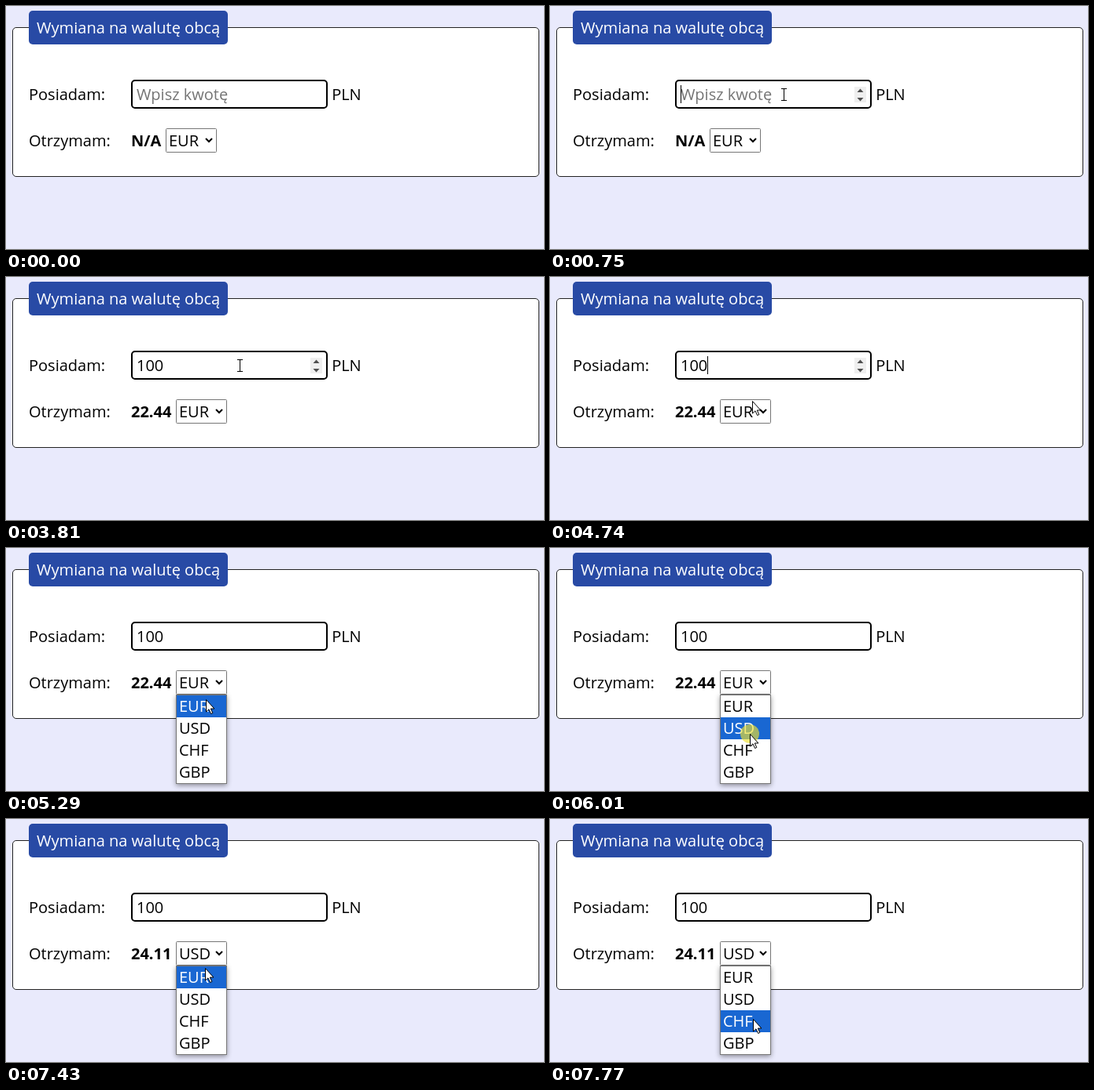
An HTML page for the animation above (8000 ms loop, 684 by 310 pixels).

```html
<!DOCTYPE html>
<html lang="pl">
<head>
<meta charset="utf-8">
<title>Wymiana na walutę obcą</title>
<style>
  html, body { margin: 0; width: 100%; height: 100%; overflow: hidden; background: #e9eafc; }
  svg { display: block; font: 20px "Open Sans", sans-serif; }
  .focus { stroke: #000; stroke-width: 2; }
  #list { filter: drop-shadow(0 2px 3px rgba(0, 0, 0, .4)); }
</style>
</head>
<body>
<svg width="684" height="310" viewBox="0 0 684 310">
  <rect x="8.5" y="27.5" width="669" height="190" rx="4.5" fill="#fff" stroke="#222"/>
  <rect x="29" y="6" width="253" height="43" rx="5" fill="#284aa5"/>
  <text x="39" y="35" fill="#fff">Wymiana na walutę obcą</text>

  <text x="29" y="120">Posiadam:</text>
  <rect class="focus" x="160" y="95" width="248" height="35" rx="4" fill="#fff"/>
  <text id="amount" x="166" y="120"></text>
  <rect id="caret" y="101" width="1" height="23"/>
  <g id="spinner">
    <rect x="387" y="103" width="15" height="20" fill="#efefef"/>
    <path d="M390.5 110h8l-4-4.5zM390.5 117h8l-4 4.5z" fill="#505050"/>
  </g>
  <text x="414.2" y="120">PLN</text>

  <text x="29" y="179">Otrzymam:</text>
  <text id="result" x="159" y="179" font-weight="700"></text>
  <g id="select">
    <rect id="thin" x=".5" y="156.5" width="64" height="30" rx="1" fill="#fff" stroke="#767676"/>
    <rect id="thick" class="focus" x="1" y="157" width="63" height="29" rx="1" fill="#fff"/>
    <text id="currency" x="4" y="179"></text>
    <path d="M51 169l4 4 4-4" fill="none" stroke="#000" stroke-width="2"/>
  </g>
  <g id="list">
    <rect x="216.5" y="187.5" width="64" height="113" fill="#fff" stroke="#767676"/>
    <rect id="highlight" x="217" width="63" height="28" fill="#1967d2"/>
  </g>

  <circle id="click" r="12" fill="#f0e130" fill-opacity=".65"/>
  <g id="cursor">
    <path id="beam" d="M-3 -7.5H4M.5 -7.5V7.5M-3 7.5H4" fill="none" stroke="#000"/>
    <path id="arrow" d="M.5 .5V16l3.5-3.2 2.6 5.7 2.2-1-2.5-5.5h4.6z" fill="#fff" stroke="#000"/>
  </g>
</svg>
<script>
const DURATION = 8000;
const CURRENCIES = ["EUR", "USD", "CHF", "GBP"];
// Mouse moves: start, end, steps, x, y
const MOVES = [
  [70, 540, 8, 297, 113],
  [4270, 4740, 8, 257, 158],
  [4810, 4810, 1, 255, 159],
  [5150, 5680, 7, 253, 238],
  [5820, 5820, 1, 254, 237],
  [6510, 6700, 4, 242, 159],
  [6970, 6970, 1, 251, 167],
  [7430, 7770, 6, 258, 255],
];
// Input states: time, typed amount, result
const TYPED = [[0, "", "N/A"], [1940, "1", "0.22"], [2800, "10", "2.24"], [3280, "100", "22.44"], [6110, "100", "24.11"]];
const CLICKS = [[680, 750], [4810, 4880], [6010, 6110], [7160, 7230]];
const OPENED = [[4880, 6110], [7230, DURATION]];

const $ = id => document.getElementById(id);
const set = (id, attrs) => { for (const k in attrs) $(id).setAttribute(k, attrs[k]); };
const show = (id, on) => set(id, { display: on ? "inline" : "none" });
const within = (ranges, t) => ranges.some(([a, b]) => t >= a && t < b);

const options = CURRENCIES.map((name, i) => {
  const text = document.createElementNS("http://www.w3.org/2000/svg", "text");
  text.textContent = name;
  text.setAttribute("x", 220);
  text.setAttribute("y", 209 + i * 28);
  return $("list").appendChild(text);
});

function mouseAt(t) {
  let x = 686, y = 345;
  for (const [start, end, steps, toX, toY] of MOVES) {
    if (t < start) break;
    const gap = (end - start) / (steps - 1) || 1;
    const step = Math.min(steps, Math.floor((t - start) / gap + .01) + 1);
    const p = Math.sin(step / steps * Math.PI / 2);
    x += (toX - x) * p;
    y += (toY - y) * p;
  }
  return [Math.round(x), Math.round(y)];
}

function draw(t) {
  const [x, y] = mouseAt(t);
  const [, amount, result] = TYPED.findLast(s => t >= s[0]);
  const inInput = x > 159 && x < 409 && y > 94 && y < 131;
  const open = within(OPENED, t);
  const selected = t < 6110 ? 0 : 1;

  $("amount").textContent = amount || "Wpisz kwotę";
  set("amount", { fill: amount ? "#000" : "#757575" });
  const blinkStart = [680, 1940, 2800, 3280].findLast(s => t >= s);
  show("caret", t >= 680 && t < 4880 && (t - blinkStart) % 1060 < 530);
  set("caret", { x: Math.floor(166 + amount.length * 11.43) });
  show("spinner", t < 4270 ? inInput : t < 4810);

  $("result").textContent = result;
  const selectX = Math.round(159 + $("result").getComputedTextLength() + 5.3);
  set("select", { transform: `translate(${selectX})` });
  $("currency").textContent = CURRENCIES[selected];
  show("thick", t >= 6110 && !open);

  show("list", open);
  const hovered = y >= 188 ? Math.floor((y - 188) / 28) : selected;
  set("highlight", { y: 188 + hovered * 28 });
  options.forEach((o, i) => o.setAttribute("fill", i === hovered ? "#fff" : "#000"));

  show("click", within(CLICKS, t));
  set("click", { cx: x, cy: y });
  show("cursor", t >= 70);
  set("cursor", { transform: `translate(${x} ${y})` });
  show("beam", inInput);
  show("arrow", !inInput);
}

function tick() {
  draw(performance.now() % DURATION);
  requestAnimationFrame(tick);
}
tick();
</script>
</body>
</html>
```
